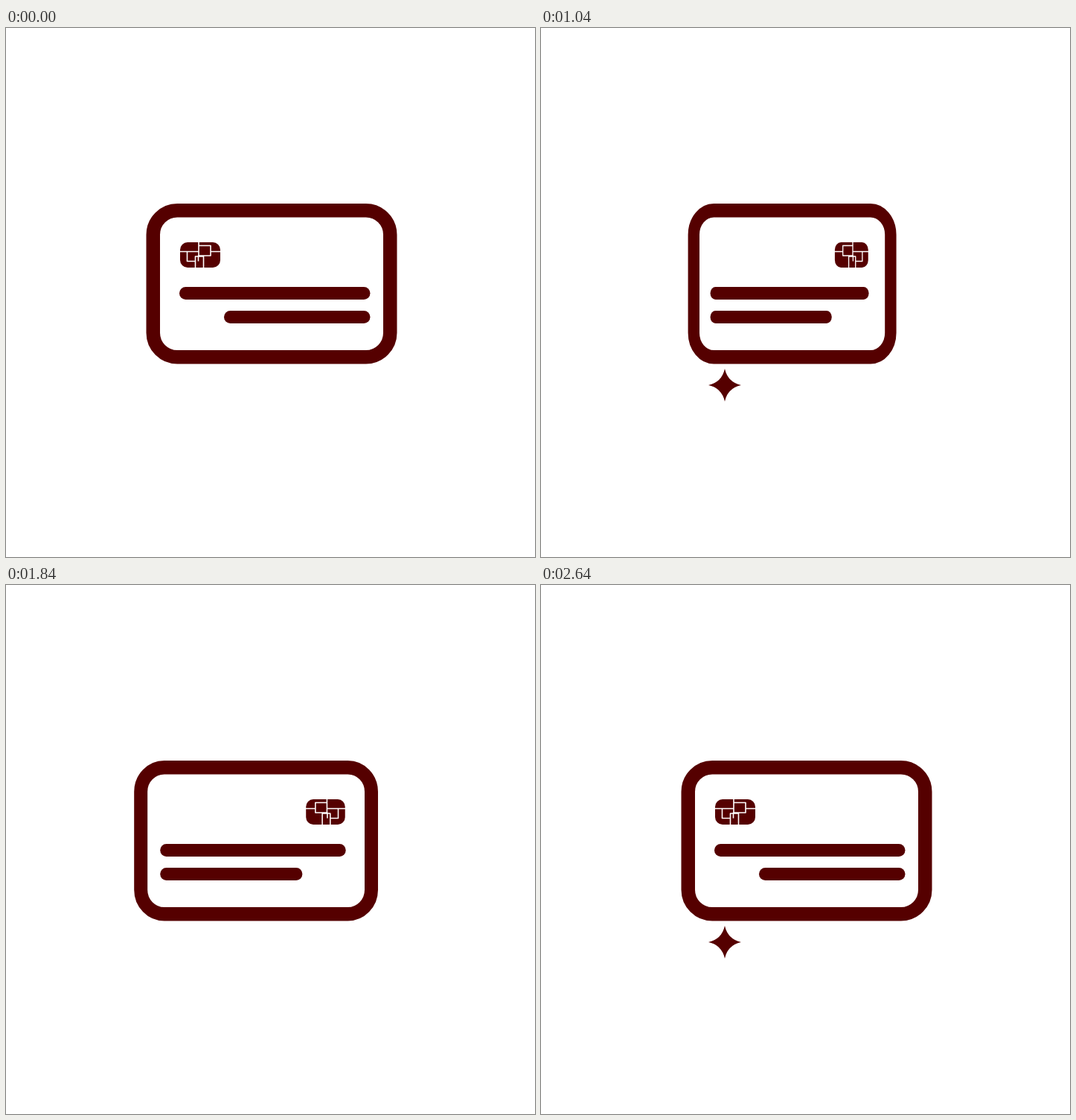
An HTML page that plays this animation: 711 by 711 pixels, repeating every 6.4 s.

```html
<!DOCTYPE html>
<html lang="en">
<head>
<meta charset="utf-8">
<title>Flipping card</title>
<style>
  html, body { margin: 0; height: 100%; overflow: hidden; background: #fff; }
  svg { display: block; width: 100%; height: 100%; fill: #500; }
</style>
</head>
<body>
<svg viewBox="0 0 711 711">
  <g id="card">
    <rect x="197.75" y="245.25" width="318.5" height="197" rx="32.5" fill="none" stroke="#500" stroke-width="18.5"/>
    <rect x="233" y="348" width="256.5" height="17" rx="8.5"/>
    <rect x="293" y="380" width="196.5" height="17" rx="8.5"/>
    <rect x="234" y="288" width="54" height="34" rx="10"/>
    <path fill="none" stroke="#fff" stroke-width="1.6" stroke-linejoin="round"
      d="M259 287V300.5H233M259 292.5H275V300.5H289M275 300V306H258.5V313.5M259 300V306M243.5 300.5V313.5H254.5M254.5 323V307H265.5V323M275 306H265.5"/>
  </g>
  <g id="stars"></g>
</svg>
<script>
const LOOP = 6400, STEP = 80, FLIP = 1320, TWINKLE_OFFSET = 1430, PIVOT = 346.4;
const card = document.getElementById('card');
const starLayer = document.getElementById('stars');

const stars = [
  { x: 201, y: 85, size: 60, start: 560, length: 150 },
  { x: 550.5, y: 586.5, size: 68, start: 565, length: 210 },
  { x: 247, y: 480, size: 40, start: 990, length: 270 },
];
for (const star of stars) {
  star.node = document.createElementNS('http://www.w3.org/2000/svg', 'path');
  star.node.setAttribute('d', 'M0-1Q.18-.18 1 0Q.18 .18 0 1Q-.18 .18-1 0Q-.18-.18 0-1Z');
  starLayer.append(star.node);
}

const clamp = v => Math.min(1, Math.max(0, v));

// Bezier (.15, 0, 0, 1): quick start, long soft landing
function settle(x) {
  let low = 0, high = 1;
  for (let i = 0; i < 24; i++) {
    const u = (low + high) / 2;
    if (0.45 * u * (1 - u) ** 2 + u ** 3 < x) low = u; else high = u;
  }
  return low * low * (3 - 2 * low);
}

function cardScale(time) {
  if (time >= 2 * FLIP) return 1;
  const phase = time % FLIP;
  if (phase <= 42) return 1;
  if (phase < 720) return 1 - 2 * settle(clamp((phase - 42) / 591));
  return 1 - 2 * settle(1 - clamp((phase - 820) / 506));
}

function draw(time) {
  card.setAttribute('transform', `translate(${PIVOT}) scale(${cardScale(time)} 1) translate(${-PIVOT})`);
  const starTime = time < TWINKLE_OFFSET ? time : time - TWINKLE_OFFSET;
  for (const { x, y, size, start, length, node } of stars) {
    const radius = size * Math.sin(Math.PI * clamp((starTime - start) / length));
    node.style.display = radius > 0.5 ? '' : 'none';
    node.setAttribute('transform', `translate(${x} ${y}) scale(${radius})`);
  }
}

function tick() {
  const time = performance.now() % LOOP;
  draw(Math.floor(time / STEP) * STEP);
  requestAnimationFrame(tick);
}
tick();
</script>
</body>
</html>
```
